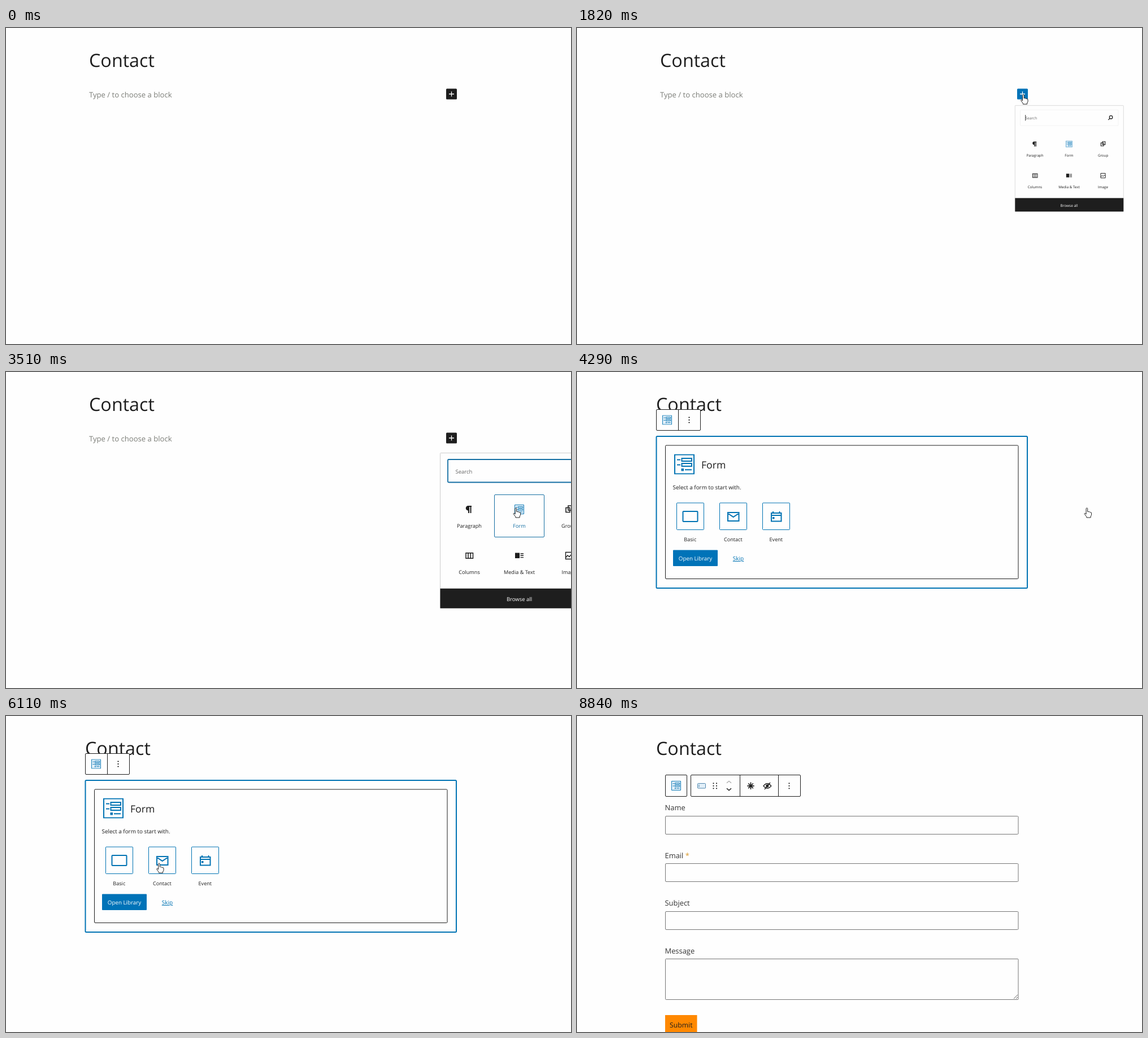
An HTML page that plays this animation: 1000x560 px, repeating every 8970 ms.

```html
<!DOCTYPE html>
<html lang="en">
<head>
<meta charset="utf-8">
<title>Adding a contact form block</title>
<style>
  html, body { margin: 0; width: 100%; height: 100%; overflow: hidden; background: #fefefe; }
  svg { display: block; }
  #stage { width: 100vw; height: 100vh; }
  text { font-family: "Open Sans", "Noto Sans", sans-serif; fill: #1e1e1e; text-rendering: geometricPrecision; }
  .mid { text-anchor: middle; }
  .title { font-size: 32.3px; }
  .small { font-size: 9.1px; }
  .label { font-size: 12.9px; fill: #333; }
  .blue { fill: none; stroke: #0073b3; }
  .dark { fill: none; stroke: #1e1e1e; }
  .panel { fill: #fefefe; stroke: #1e1e1e; }
  .pale { fill: #e2eff8; }
  .field rect { fill: #fefefe; stroke: #767676; }
  .hover .tile { stroke: #156fa3; }
  .hover text { fill: #156fa3; }
  .tile { fill: none; stroke: none; }
  #cursor path { fill: #fff; stroke: #222; stroke-linejoin: round; }
</style>
</head>
<body>
<svg id="stage" viewBox="0 0 1000 560">
  <defs>
    <symbol id="formIcon" viewBox="0 0 36 36">
      <path class="blue" stroke-width="2" d="M1 1H35V35H1ZM5 10H11M5 19H11M13.500 7.500H31V12.500H13.500ZM13.500 16.500H31V21.500H13.500ZM13.500 26.500H16V29H13.500ZM19 27.700H31"/>
    </symbol>
    <g id="smallFormIcon">
      <rect class="pale" width="17" height="17"/>
      <use href="#formIcon" width="17" height="17"/>
    </g>
    <g id="moreDots">
      <circle r="1.100" cy="-4.500"/><circle r="1.100"/><circle r="1.100" cy="4.500"/>
    </g>
  </defs>

  <text id="title" class="title" y="69">Contact</text>

  <g id="prompt">
    <text x="147" y="122.500" font-size="13.100" style="fill:#7b7d77">Type / to choose a block</text>
    <rect id="addButton" x="779" y="107.500" width="19" height="19" rx="1.500"/>
    <path d="M784 117H793M788.500 112.500V121.500" stroke="#fff" stroke-width="1.300"/>
  </g>

  <g id="popup">
    <rect x="768.500" y="143.500" width="281" height="275" rx="1" fill="#fefefe" stroke="#ccc"/>
    <rect id="searchBox" x="782" y="155" width="254" height="40.500" rx="1.500" fill="#fefefe"/>
    <text x="795.500" y="180" font-size="9.500" style="fill:#666">Search</text>
    <path id="caret" d="M795.500 168V183" stroke="#000" stroke-width="1.200"/>
    <g class="dark" stroke-width="1.800"><circle cx="1017" cy="174" r="4"/><path d="M1014 177L1010 181"/></g>

    <path d="M824 237H818A4.200 4.200 0 0 0 818 245.500V250H820V239H821.500V250H823.500V239H824Z" fill="#1e1e1e"/>
    <text class="small mid" x="820" y="276">Paragraph</text>

    <g id="formTile">
      <rect class="tile" x="864.500" y="217.500" width="88" height="75" rx="1.500"/>
      <use href="#smallFormIcon" x="900" y="235"/>
      <text class="small mid" x="908.500" y="276">Form</text>
    </g>

    <path class="dark" stroke-width="1.600" d="M991 240.500H998V248.500H991ZM995 237H1002V245H995Z"/>
    <text class="small mid" x="996.500" y="276">Group</text>

    <path class="dark" stroke-width="1.500" d="M814 320.700H826.500V330.300H814ZM818 321V330M822.300 321V330"/>
    <text class="small mid" x="820" y="358">Columns</text>

    <rect x="901" y="320.500" width="8" height="9.500" fill="#1e1e1e"/>
    <path class="dark" stroke-width="1.400" d="M910.500 322H916M910.500 325.300H916M910.500 328.600H916"/>
    <text class="small mid" x="908.500" y="358">Media &amp; Text</text>

    <path class="dark" stroke-width="1.400" d="M990.500 319.500H1002.500V331.500H990.500ZM990.500 329L994 325 997 327.500 1000 324 1002.500 326.500"/>
    <text class="small mid" x="996.500" y="358">Image</text>

    <rect x="768.500" y="383.700" width="281" height="35" fill="#1e1e1e"/>
    <text class="mid" x="908.500" y="406" font-size="9.500" font-weight="500" style="fill:#fff">Browse all</text>
  </g>

  <g id="chooser">
    <rect x="140.500" y="114" width="656.500" height="269" rx="1.500" class="blue" stroke-width="2"/>
    <rect x="156.500" y="130" width="624.500" height="236.500" rx="1.500" class="panel"/>
    <rect x="140.500" y="66.500" width="78" height="37" rx="1.500" class="panel"/>
    <path class="dark" d="M179.500 66V104"/>
    <use href="#smallFormIcon" x="151" y="76.500"/>
    <use href="#moreDots" x="198.500" y="85"/>

    <use href="#formIcon" x="172" y="145.500" width="36" height="36"/>
    <text x="220" y="171" font-size="17.600">Form</text>
    <text x="169.500" y="208" font-size="9.900">Select a form to start with.</text>

    <g class="blue">
      <rect x="176.500" y="232" width="48" height="47.500" rx="1"/>
      <rect x="252.500" y="232" width="48" height="47.500" rx="1"/>
      <rect x="328.500" y="232" width="48" height="47.500" rx="1"/>
      <g stroke-width="2">
        <rect x="187.500" y="247" width="26" height="18" rx="1"/>
        <path d="M267 249H286.500V264H267ZM267 250.500L276.700 257 286.500 250.500"/>
        <path d="M344 250H361.500V264.500H344ZM344 254H361.500M347 247V250M358.500 247V250"/>
      </g>
    </g>
    <rect x="346" y="257" width="3.500" height="3.500" fill="#0073b3"/>
    <text class="small mid" x="200.300" y="299.500">Basic</text>
    <text class="small mid" x="276.300" y="299.500">Contact</text>
    <text class="small mid" x="352.300" y="299.500">Event</text>

    <rect x="170" y="315.500" width="79" height="28.500" rx="1" fill="#0073b8"/>
    <text class="mid" x="209.500" y="334" font-size="9.800" style="fill:#fff">Open Library</text>
    <text x="275.800" y="334" font-size="10" style="fill:#0073b3" text-decoration="underline">Skip</text>
  </g>

  <g id="form">
    <rect x="156.500" y="104.500" width="38" height="38" rx="1.500" class="panel"/>
    <use href="#smallFormIcon" x="167" y="115"/>
    <rect x="201.500" y="104.500" width="194" height="38" rx="1.500" class="panel"/>
    <path class="dark" d="M288.500 104V143M356.500 104V143"/>
    <rect class="pale" x="213.500" y="119.500" width="14" height="8.500" rx="1" stroke="#4f86ad"/>
    <path d="M216 121.500V126" stroke="#4f86ad"/>
    <g fill="#1e1e1e">
      <use href="#moreDots" x="241.500" y="123.800"/>
      <use href="#moreDots" x="247" y="123.800"/>
      <use href="#moreDots" x="375.500" y="123.800"/>
    </g>
    <path d="M265 118.800L269 115.300 273 118.800" fill="none" stroke="#aaa" stroke-width="1.300"/>
    <path class="dark" stroke-width="1.500" d="M265 128.300L269 131.800 273 128.300"/>
    <path class="dark" stroke-width="1.700" d="M307.500 117.500V130M301.300 123.800H313.700M303.200 119.500L311.800 128.100M311.800 119.500L303.200 128.100"/>
    <path class="dark" stroke-width="1.300" d="M330 124Q336.800 115.500 343.700 124Q336.800 132 330 124ZM332 130L342 118"/>
    <circle cx="336.800" cy="123.800" r="2.600" fill="#1e1e1e"/>

    <g class="field">
      <text class="label" x="155.500" y="167.300">Name</text>
      <rect x="156.500" y="177.500" width="624.500" height="32" rx="1.500"/>
      <text class="label" x="155.500" y="252">Email <tspan fill="#d9992c">*</tspan></text>
      <rect x="156.500" y="261.500" width="624.500" height="32" rx="1.500"/>
      <text class="label" x="155.500" y="336.300">Subject</text>
      <rect x="156.500" y="346.500" width="624.500" height="32" rx="1.500"/>
      <text class="label" x="155.500" y="421">Message</text>
      <rect x="156.500" y="430.500" width="624.500" height="72" rx="1"/>
    </g>
    <path d="M773 501L780 494M777 501L780 498" stroke="#666"/>
    <rect x="156" y="530" width="56.500" height="30" fill="#ff8800"/>
    <text class="mid" x="184.300" y="552" font-size="12.200">Submit</text>
  </g>

  <g id="cursor">
    <path id="hand" d="M-1.400 11V1.300A1.300 1.300 0 0 1 1.200 1.300V6.500Q2.500 5.400 3.600 7 5 6.200 6 7.700 8 7.200 8 9.200V12.500L6.600 15V17H-.6V15.500L-4.300 10.600Q-4.200 8.600-2.600 9.600Z"/>
    <path id="arrow" d="M0 0V15L3.500 11.800 6 17.200 8 16.200 5.600 11H10Z"/>
  </g>
</svg>
<script>
const LOOP = 8970, STEP = 130;
const el = id => document.getElementById(id);
const show = (id, on) => { el(id).style.display = on ? '' : 'none'; };
const within = (t, from, to) => t >= from && t < to;

// Cursor stops: time, x, y
const stops = [
  [390, 620, 339], [1040, 789, 120], [1170, 789, 120], [1430, 790, 118],
  [2080, 790, 118], [2990, 902.5, 241], [4550, 902.5, 241], [5460, 267.5, 264],
  [5720, 267.5, 264], [6110, 271, 261], [7410, 271, 261], [8320, 530, 580]
];

function cursorAt(t) {
  const next = stops.findIndex(stop => stop[0] > t);
  if (next < 1) return stops[next < 0 ? stops.length - 1 : 0].slice(1);
  const [t0, x0, y0] = stops[next - 1], [t1, x1, y1] = stops[next];
  const u = (t - t0) / (t1 - t0), k = u * u * (3 - 2 * u);
  return [x0 + (x1 - x0) * k, y0 + (y1 - y0) * k];
}

function draw(t) {
  const [x, y] = cursorAt(t);
  const open = within(t, 1820, 4030), focused = t >= 1950;
  const overButton = within(t, 390, 4030) && x > 779 && x < 798 && y > 107 && y < 127;
  const overForm = open && x > 865 && y > 217;
  const overChoice = within(t, 5000, 7500) && x < 301;

  el('title').setAttribute('x', t < 4160 ? 147 : 140);
  show('prompt', t < 4160);
  el('addButton').setAttribute('fill', overButton ? '#0073b8' : '#1e1e1e');

  show('popup', open);
  const scale = focused ? 1 : 0.683;
  el('popup').setAttribute('transform', `translate(790 124) scale(${scale}) translate(-790 -124)`);
  el('searchBox').setAttribute('stroke', focused ? '#156fa3' : '#eee');
  el('searchBox').setAttribute('stroke-width', focused ? 1.8 : 1);
  show('caret', !focused);
  el('formTile').setAttribute('class', overForm ? 'hover' : '');

  show('chooser', within(t, 4160, 6500));
  show('form', t >= 6760);

  const hand = overButton || overForm || overChoice || within(t, 4030, 4680);
  show('cursor', within(t, 390, 8320));
  show('hand', hand);
  show('arrow', !hand);
  el('cursor').setAttribute('transform', `translate(${x} ${y})`);
}

const start = performance.now();
function tick() {
  const t = (performance.now() - start) % LOOP;
  draw(Math.floor(t / STEP) * STEP);
  requestAnimationFrame(tick);
}
tick();
</script>
</body>
</html>
```
